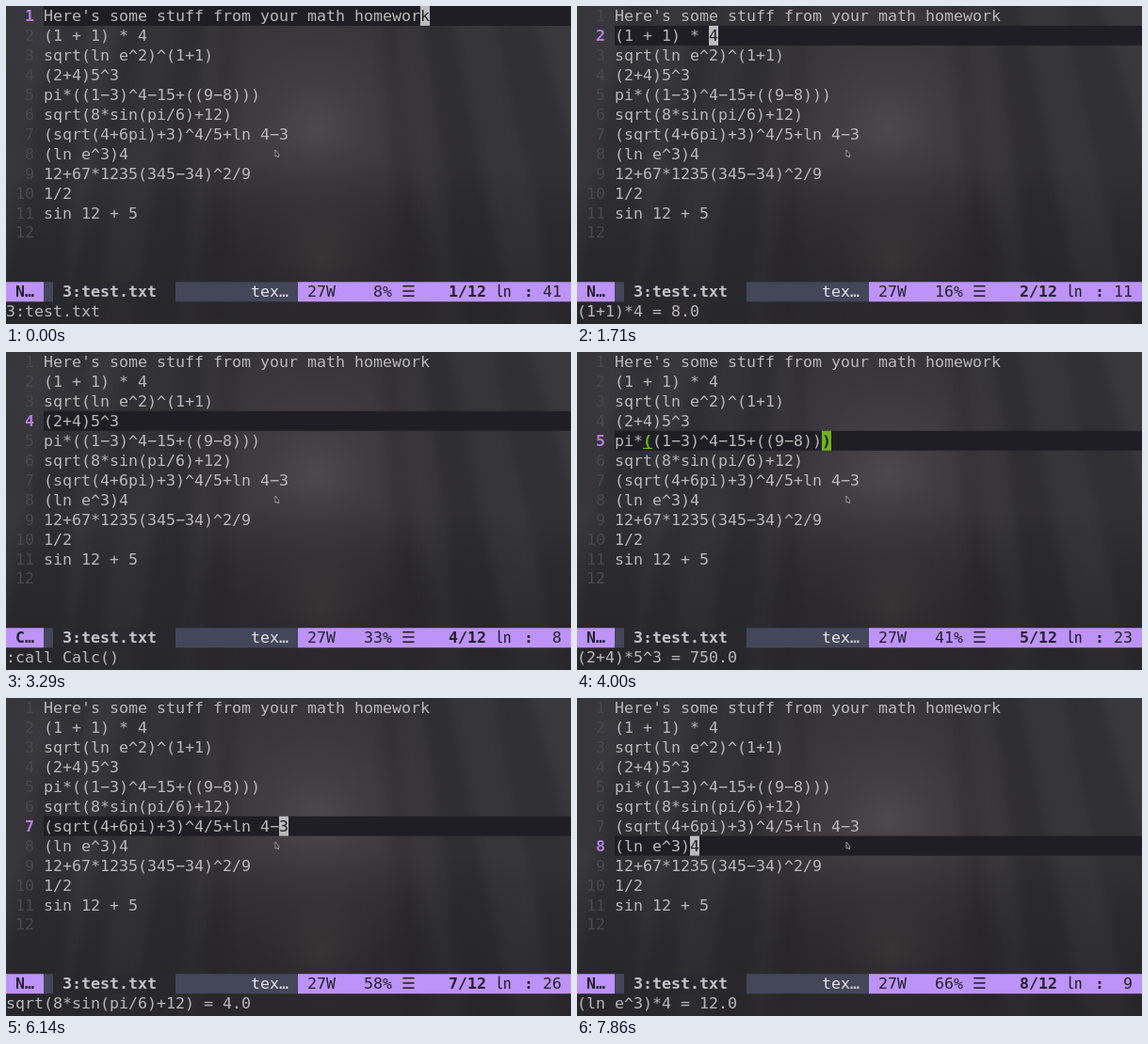
An HTML page with a canvas that plays this animation: 600x338 px, repeating every 8000 ms.

```html
<!DOCTYPE html>
<html lang="en">
<head>
<meta charset="utf-8">
<title>Calculator in a text editor</title>
<style>
  html, body { margin: 0; width: 100%; height: 100%; overflow: hidden; background: #37363b; }
  canvas { display: block; }
</style>
</head>
<body>
<canvas id="stage" width="600" height="338"></canvas>
<script>
const W = 600, H = 338, LOOP = 8000;
const CELL = 10, ROW = 20.95, BASELINE = 16, TEXT_X = 40;
const FONT = '16.61px "DejaVu Sans Mono", "Noto Sans CJK SC", "Noto Sans CJK JP", monospace';
const PURPLE = '#bd93f9', SLATE = '#44465a', INK = '#25222e', TEXT = '#b9b8bb', GREEN = '#6fb516';

const lines = [
  "Here's some stuff from your math homework",
  '(1 + 1) * 4',
  'sqrt(ln e^2)^(1+1)',
  '(2+4)5^3',
  'pi*((1−3)^4−15+((9−8)))',
  'sqrt(8*sin(pi/6)+12)',
  '(sqrt(4+6pi)+3)^4/5+ln 4−3',
  '(ln e^3)4',
  '12+67*1235(345−34)^2/9',
  '1/2',
  'sin 12 + 5',
  ''
];

// For each line: when the cursor arrives, the command starts, the answer shows.
const steps = [
  { at: 0, call: Infinity, done: 0, answer: '3:test.txt' },
  { at: 850, call: 1280, done: 1560, answer: '(1+1)*4 = 8.0' },
  { at: 2130, call: 2420, done: 2700, answer: 'sqrt(ln e^2)^(1+1) = 2.0' },
  { at: 3130, call: 3280, done: 3560, answer: '(2+4)*5^3 = 750.0' },
  { at: 3850, call: 4270, done: 4560, answer: 'pi*((1−3)^4−15+((9−8))) = 6.283185307179586' },
  { at: 4850, call: 5130, done: 5420, answer: 'sqrt(8*sin(pi/6)+12) = 4.0' },
  { at: 5990, call: 6420, done: 6700, answer: '(sqrt(4+6*pi)+3)^4/5+ln 4−3 = 731.1692872979955' },
  { at: 7270, call: 7420, done: 7700, answer: '(ln e^3)*4 = 12.0' }
];

const ctx = document.getElementById('stage').getContext('2d');
const backdrop = paintForest();

function paintForest() {
  const canvas = document.createElement('canvas');
  canvas.width = W;
  canvas.height = H;
  const g = canvas.getContext('2d');
  g.fillStyle = '#39383d';
  g.fillRect(0, 0, W, H);

  const glow = (x, y, radius, color) => {
    const fade = g.createRadialGradient(x, y, 0, x, y, radius);
    fade.addColorStop(0, color);
    fade.addColorStop(1, 'transparent');
    g.fillStyle = fade;
    g.fillRect(0, 0, W, H);
  };
  glow(330, 130, 240, 'rgba(104,96,100,.42)');
  glow(335, 270, 130, 'rgba(104,88,84,.3)');
  glow(60, 40, 150, 'rgba(70,72,82,.25)');

  // Blurred trunks leaning out from the clearing: top x, bottom x, width, darkness.
  g.filter = 'blur(5px)';
  const trunks = [
    [55, -10, 50, .2], [130, 60, 26, .16], [190, 135, 34, .18], [232, 205, 20, .12],
    [395, 425, 22, .12], [440, 490, 38, .2], [515, 590, 55, .22]
  ];
  for (const [top, bottom, width, dark] of trunks) {
    g.fillStyle = `rgba(24,23,27,${dark})`;
    g.beginPath();
    g.moveTo(top, -10);
    g.lineTo(top + width * .7, -10);
    g.lineTo(bottom + width * 1.3, H + 10);
    g.lineTo(bottom, H + 10);
    g.fill();
  }
  g.filter = 'none';

  const shade = g.createLinearGradient(0, 0, 0, H);
  shade.addColorStop(.5, 'transparent');
  shade.addColorStop(1, 'rgba(24,22,25,.4)');
  g.fillStyle = shade;
  g.fillRect(0, 0, W, H);
  return canvas;
}

function text(str, x, row, color = TEXT, bold = false) {
  ctx.font = (bold ? 'bold ' : '') + FONT;
  ctx.fillStyle = color;
  ctx.fillText(str, x, row * ROW + BASELINE);
}

function box(x, row, width, color) {
  ctx.fillStyle = color;
  ctx.fillRect(x, row * ROW, width, ROW);
}

function openingParen(line) {
  let depth = 0;
  for (let i = line.length - 1; i >= 0; i--) {
    if (line[i] === ')') depth++;
    if (line[i] === '(' && --depth === 0) return i;
  }
}

function drawParen(char, col, row) {
  const x = TEXT_X + col * CELL;
  box(x, row, CELL, '#1f1e24');
  text(char, x, row, GREEN, true);
  ctx.fillStyle = GREEN;
  ctx.fillRect(x, row * ROW + 18, CELL, 1.2);
}

function drawCursor(row, calling) {
  const line = lines[row], last = line.length - 1, x = TEXT_X + last * CELL;
  const matched = line[last] === ')';
  if (matched) drawParen('(', openingParen(line), row);
  if (!calling) {
    box(x, row, CELL, matched ? GREEN : '#bcbbbe');
    text(line[last], x, row, '#222127', matched);
  } else if (matched) {
    drawParen(')', last, row);
  }
}

function drawStatus(row, calling) {
  const bar = 14;
  box(0, bar, 40, PURPLE);
  box(40, bar, 10, SLATE);
  box(50, bar, 130, 'rgba(40,40,48,.55)');
  box(180, bar, 130, SLATE);
  box(310, bar, 290, PURPLE);
  text(calling ? 'C…' : 'N…', 10, bar, INK, true);
  text('3:test.txt', 60, bar, '#c4c3c8', true);
  text('tex…', 260, bar, '#e4e3e8');
  const percent = Math.floor((row + 1) * 100 / lines.length) + '%';
  text('27W', 320, bar, INK);
  text(percent.padStart(3), 380, bar, INK);
  text('☰', 420, bar, INK);
  text(`${row + 1}/12`, 470, bar, INK, true);
  text('㏑', 520, bar, INK);
  text(':', 550, bar, INK, true);
  text(String(lines[row].length).padStart(2), 570, bar, INK);
}

function drawPointer() {
  ctx.beginPath();
  ctx.moveTo(286, 153);
  ctx.lineTo(286, 160);
  ctx.lineTo(288, 159);
  ctx.lineTo(289, 161);
  ctx.lineTo(290, 158);
  ctx.closePath();
  ctx.fillStyle = '#222126';
  ctx.fill();
  ctx.strokeStyle = '#aaa8ac';
  ctx.lineWidth = .9;
  ctx.stroke();
}

function draw(time) {
  const row = steps.findLastIndex(step => time >= step.at);
  const step = steps[row];
  const calling = time >= step.call && time < step.done;
  const message = calling ? ':call Calc()' : steps.findLast(s => time >= s.done).answer;

  ctx.drawImage(backdrop, 0, 0);
  box(TEXT_X, row, W - TEXT_X, '#1f1e24');
  lines.forEach((line, i) => {
    const current = i === row;
    text(String(i + 1).padStart(2), 10, i, current ? '#b57edc' : '#4a494f', current);
    text(line, TEXT_X, i);
  });
  text('~', 0, 12, '#2c2b30');
  drawCursor(row, calling);
  drawStatus(row, calling);
  text(message, 0, 15);
  drawPointer();
}

function tick() {
  draw(performance.now() % LOOP);
  requestAnimationFrame(tick);
}
tick();
</script>
</body>
</html>
```
